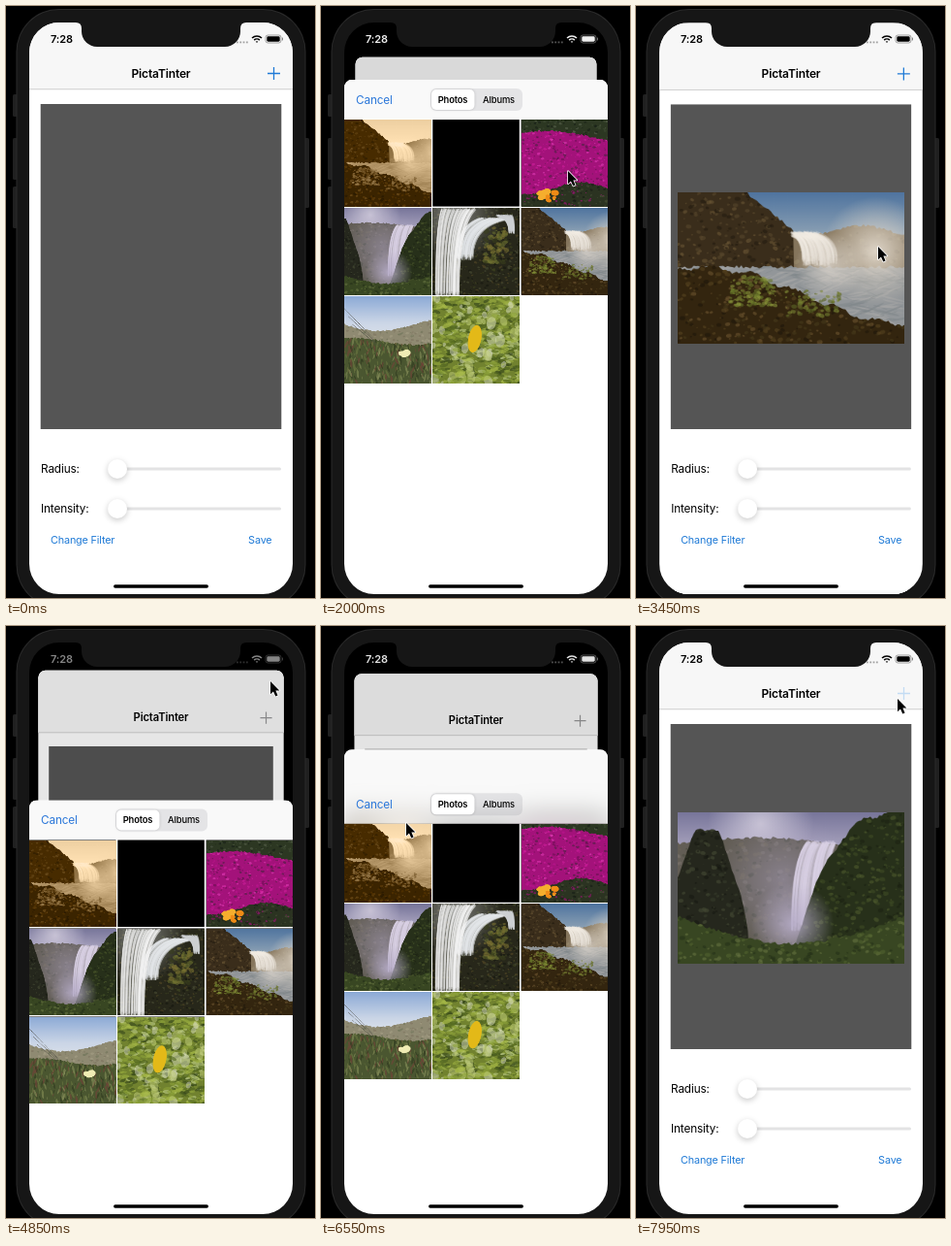
These frames come from a looping animation (319 px wide and 610 px high, 8000 ms). An HTML page with a canvas:

```html
<!DOCTYPE html>
<html lang="en">
<head>
<meta charset="utf-8">
<title>Photo picker</title>
<style>
html, body { margin: 0; width: 100%; height: 100%; overflow: hidden; background: #000; }
canvas { display: block; width: 319px; height: 610px; }
</style>
</head>
<body>
<canvas id="stage" width="319" height="610"></canvas>
<script>
const g = document.getElementById('stage').getContext('2d');
const LOOP = 8000, OMEGA = 18.26;
const SCREEN = { x: 24, y: 17, w: 272, h: 589 };
const BEZEL = '#161616', BLUE = '#1f7ad6';
const clamp = (v, lo = 0, hi = 1) => Math.max(lo, Math.min(hi, v));
const mix = (a, b, k) => a + (b - a) * k;
const ease = k => k * k * (3 - 2 * k);
const { sin, abs, PI } = Math;

function box(c, x, y, w, h, r, fill) {
  c.beginPath();
  c.roundRect(x, y, w, h, r);
  c.fillStyle = fill;
  c.fill();
}

function text(str, x, y, size, color, weight = 400, align = 'left') {
  g.font = `${weight} ${size}px Inter, "Open Sans", sans-serif`;
  g.letterSpacing = '-0.15px';
  g.textAlign = align;
  g.textBaseline = 'middle';
  g.fillStyle = color;
  g.fillText(str, x, y);
}

// ---- Photos: painted scenes, 300 x 200 each ----
function scene(sky, paint) {
  const cv = document.createElement('canvas');
  cv.width = 300;
  cv.height = 200;
  const c = cv.getContext('2d');
  let seed = 7;
  const rnd = () => (seed = seed * 16807 % 2147483647) / 2147483647;
  const grad = c.createLinearGradient(0, 0, 0, 120);
  sky.forEach((s, i) => grad.addColorStop(i / (sky.length - 1), s));
  c.fillStyle = grad;
  c.fillRect(0, 0, 300, 200);

  // Soft blotches scattered over an area
  const dabs = (n, x, y, w, h, size, tones, tall = 0.7, alpha = 0.6) => {
    c.globalAlpha = alpha;
    for (let i = 0; i < n; i++) {
      const r = size * (0.3 + rnd());
      c.beginPath();
      c.ellipse(x + rnd() * w, y + rnd() * h, r, r * tall, rnd() - 0.5, 0, 7);
      c.fillStyle = tones[i % tones.length];
      c.fill();
    }
    c.globalAlpha = 1;
  };
  // Ground below a ridge line, with its texture
  const hill = (ridge, fill, tones = [], size = 3, tall = 0.7) => {
    c.save();
    c.beginPath();
    c.moveTo(0, 200);
    for (let x = 0; x <= 300; x += 3) c.lineTo(x, ridge(x) + rnd() * 4 - 2);
    c.lineTo(300, 200);
    c.fillStyle = fill;
    c.fill();
    c.clip();
    if (tones.length) dabs(900, 0, 0, 300, 200, size, tones, tall);
    c.restore();
  };
  // Falling water: many thin strands that bend over an edge
  const fall = (x0, y0, x1, y1, w0, w1, color) => {
    c.strokeStyle = color;
    c.lineWidth = 2.5;
    c.globalAlpha = 0.35;
    for (let i = 0; i < 110; i++) {
      const u = rnd() - 0.5;
      c.beginPath();
      c.moveTo(x0 + u * w0, y0 + rnd() * 6);
      c.quadraticCurveTo(x1 + u * w1, mix(y0, y1, 0.2), x1 + u * w1, y1 - rnd() * 14);
      c.stroke();
    }
    c.globalAlpha = 1;
  };
  const glow = (x, y, r, rgb, a) => {
    const m = c.createRadialGradient(x, y, 0, x, y, r);
    m.addColorStop(0, `rgba(${rgb},${a})`);
    m.addColorStop(1, `rgba(${rgb},0)`);
    c.fillStyle = m;
    c.fillRect(0, 0, 300, 200);
  };
  paint({ c, dabs, hill, fall, glow });
  return cv;
}

function goldFalls({ dabs, hill, fall, glow }) {
  hill(x => x > 150 ? 50 + 6 * sin(x / 22) : 210, '#85755c', ['#978769', '#6f6049']);
  hill(x => x < 156 ? (x - 90) * 0.8 : 210, '#3a2d1b', ['#57462c', '#241c10', '#6a5535']);
  hill(() => 99, '#929699', ['#a5a6a5', '#81878a'], 16, 0.08);
  glow(262, 78, 72, '226,217,204', 0.95);
  fall(166, 52, 188, 98, 34, 46, '#f1ece3');
  glow(200, 98, 45, '222,215,206', 0.8);
  hill(x => 100 + 74 * ease(clamp((x - 40) / 260)) + 3 * sin(x / 9), '#33250f',
    ['#574321', '#1e160b', '#6d5430', '#463a1b']);
  dabs(130, 70, 112, 60, 38, 3, ['#68742a', '#88953a']);
  dabs(90, 140, 130, 75, 34, 3, ['#5d6826', '#7c8634']);
}

const gold = scene(['#4f749f', '#8fa3b5', '#d5cbba'], goldFalls);

const sepia = scene(['#d9d4c0', '#efe8d0', '#f5efdb'], kit => {
  goldFalls(kit);
  kit.c.globalCompositeOperation = 'color';
  kit.c.fillStyle = '#86683a';
  kit.c.fillRect(0, 0, 300, 200);
});

const violet = scene(['#77759a', '#b4aec6', '#d4cbd6'], ({ hill, fall, glow }) => {
  glow(110, 16, 70, '228,222,234', 0.7);
  hill(x => 42 - 8 * sin(x / 65), '#625d55', ['#6f6859', '#4c4d42', '#79726c']);
  glow(140, 90, 90, '176,166,196', 0.5);
  fall(190, 38, 174, 158, 38, 46, '#d9d1e6');
  hill(x => x > 150 ? 195 * ((300 - x) / 150) ** 2.8 + 3 * sin(x / 8) : 210, '#27301a',
    ['#3e4b25', '#1b2213', '#4d5a2d']);
  hill(x => x < 95 ? 20 + (x - 38) ** 2 / 22 + 5 * sin(x / 5) : 210, '#25271d',
    ['#363b2b', '#171812', '#454a34']);
  glow(152, 148, 55, '184,174,202', 0.9);
  hill(x => 138 + 36 * sin(PI * x / 300), '#384622', ['#53632f', '#263118', '#677440']);
});

const stream = scene(['#4a4d3c', '#33351f'], ({ dabs, hill, fall, glow }) => {
  hill(() => 0, '#27271a', ['#3c4121', '#15160f', '#544827', '#484c35']);
  glow(100, 20, 110, '196,198,202', 0.55);
  dabs(90, 170, 45, 50, 80, 6, ['#6a7030', '#7c7232', '#383d1c']);
  fall(190, 22, 124, 120, 70, 40, '#e2e4e7');
  fall(110, 0, 84, 205, 80, 55, '#f2f2f4');
  fall(215, 15, 232, 60, 40, 14, '#cfd1d4');
});

const flowers = scene(['#28331f', '#3b4028'], ({ dabs, hill }) => {
  hill(() => 0, '#2c3722', ['#58624c', '#171f16', '#3f4c33']);
  hill(x => 42 - 16 * sin(x / 70), '#a3127a', ['#cf1f9c', '#6c0f52', '#e03bb4', '#bd1590', '#4a2340']);
  hill(x => 158 + 14 * sin(x / 40), '#2b3321', ['#454d35', '#171d14', '#a3127a']);
  dabs(16, 88, 164, 42, 22, 9, ['#ef8b16', '#f5ae2e'], 0.7, 1);
});

const field = scene(['#8caad6', '#cad5e6', '#e8ebef'], ({ c, dabs, hill }) => {
  hill(x => 66 - 14 * sin(x / 48 + 2), '#8f8a72', ['#a59f86', '#70755a', '#7d7460']);
  hill(x => 104 - 8 * sin(x / 45), '#4a5630', ['#6d7942', '#303a1e', '#74443a', '#87905a'], 2, 4);
  c.strokeStyle = '#4d4c45';
  for (let d = 0; d < 40; d += 18) {
    c.beginPath();
    c.moveTo(50 + d / 2, 28 + d);
    c.lineTo(116 + d / 3, 96 + d / 2);
    c.stroke();
  }
  dabs(6, 178, 126, 14, 8, 10, ['#efecb4'], 0.6, 1);
});

const leaves = scene(['#a5aa83', '#73863a'], ({ c, dabs, hill }) => {
  hill(() => 0, '#71822f', ['#9db041', '#4b5f1e', '#bac984', '#35451a', '#8ca03a'], 8, 0.45);
  dabs(60, 50, 0, 200, 200, 9, ['#d5d9c0', '#c1cd7c'], 1.4, 0.5);
  dabs(90, 50, 0, 200, 200, 10, ['#8ea43a', '#54691f', '#a9bb4a'], 0.4);
  c.fillStyle = '#e3b918';
  c.beginPath();
  c.ellipse(147, 98, 15, 32, 0.2, 0, 7);
  c.fill();
});

const GRID = [sepia, null, flowers, violet, stream, gold, field, leaves];

// ---- Timing ----
const PLUS = [272, 72];
const MOVES = [
  { at: 150, ms: 700, to: PLUS },
  { at: 1150, ms: 400, to: [255, 170] },
  { at: 2000, ms: 400, to: [250, 248] },
  { at: 4050, ms: 300, to: PLUS },
  { at: 4550, ms: 300, to: [273, 57] },
  { at: 5550, ms: 700, to: [88, 203] },
  { at: 7400, ms: 450, to: [270, 75] }
];
// The sheet opens or closes; it can stall for a moment while a photo loads
const SHEET = [
  { at: -LOOP, closing: true, photo: null },
  { at: 1600, closing: false, photo: null, stallAt: 280, stall: 120 },
  { at: 2930, closing: true, photo: gold, stallAt: 20, stall: 180 },
  { at: 4695, closing: false, photo: gold },
  { at: 6517, closing: true, photo: violet }
];

function cursorAt(t) {
  return MOVES.reduce(([x, y], { at, ms, to }) => {
    const k = ease(clamp((t - at) / ms));
    return [mix(x, to[0], k), mix(y, to[1], k)];
  }, [272, 497]);
}

function sheetAt(t) {
  const { at, closing, photo, stallAt = 0, stall = 0 } = SHEET.findLast(e => e.at <= t);
  const gone = t - at;
  return { closing, photo, s: (gone - clamp(gone - stallAt, 0, stall)) / 1000 };
}

// ---- Interface ----
function plus(color) {
  g.strokeStyle = color;
  g.lineWidth = 1.3;
  g.beginPath();
  g.moveTo(270, 69.5); g.lineTo(283, 69.5);
  g.moveTo(276.5, 63); g.lineTo(276.5, 76);
  g.stroke();
}

function slider(label, y) {
  text(label, 36, y + 0.5, 11.8, '#000');
  box(g, 105, y - 1.5, 179, 3, 1.5, '#e3e3e4');
  g.save();
  g.shadowColor = 'rgba(0,0,0,.22)';
  g.shadowBlur = 6;
  g.shadowOffsetY = 2;
  box(g, 105, y - 10, 20, 20, 10, '#fff');
  g.restore();
}

function mainPage(photo, plusColor) {
  const { x, y, w, h } = SCREEN;
  box(g, x, y, w, h, 8, '#fff');
  box(g, x, y, w, 69, [8, 8, 0, 0], '#f7f7f7');
  g.fillStyle = '#bcbcbc';
  g.fillRect(x, 85.5, w, 0.7);
  text('PictaTinter', 160, 70, 12, '#000', 600, 'center');
  plus(plusColor);
  g.fillStyle = '#555';
  g.fillRect(35.7, 101, 248.6, 335);
  if (photo) g.drawImage(photo, 43, 191.5, 234, 156);
  slider('Radius:', 477);
  slider('Intensity:', 518);
  text('Change Filter', 46, 551, 10.8, BLUE);
  text('Save', 274.5, 551, 10.8, BLUE, 400, 'right');
}

function photoGrid(top) {
  GRID.forEach((img, i) => {
    const x = SCREEN.x + i % 3 * 91.3, y = top + Math.floor(i / 3) * 91;
    g.fillStyle = '#000';
    g.fillRect(x, y, 89.5, 89.5);
    if (img) g.drawImage(img, 50, 0, 200, 200, x, y, 89.5, 89.5);
  });
}

function sheet(top, closing, s) {
  const { x, w } = SCREEN;
  const shift = closing ? 36 * clamp((s - 0.02) / 0.0187) : 0;
  const barH = closing ? 76.5 : 40.5;
  const gridTop = top + 41 + shift;
  g.save();
  g.beginPath();
  g.roundRect(x, top, w, 610, [8, 8, 0, 0]);
  g.clip();
  g.fillStyle = '#fff';
  g.fillRect(x, top, w, 610);
  photoGrid(gridTop);

  // Translucent bar: the grid shows through as a blur
  g.save();
  g.beginPath();
  g.rect(x, top, w, barH);
  g.clip();
  g.fillStyle = '#fff';
  g.fillRect(x, top, w, barH);
  if (closing) {
    g.filter = 'blur(14px)';
    photoGrid(gridTop);
    g.filter = 'none';
  }
  g.fillStyle = 'rgba(248,248,248,.82)';
  g.fillRect(x, top, w, barH);
  g.restore();

  const mid = top + barH - 20;
  text('Cancel', 36, mid + 0.5, 11.8, '#2b77d9');
  box(g, 113, mid - 11.5, 95, 23, 6, 'rgba(118,118,128,.16)');
  g.shadowColor = 'rgba(0,0,0,.18)';
  g.shadowBlur = 3;
  box(g, 114, mid - 10.5, 44.5, 21, 5, '#fff');
  g.shadowColor = 'transparent';
  text('Photos', 136, mid + 0.5, 9.4, '#000', 600, 'center');
  text('Albums', 183.5, mid + 0.5, 9.4, '#000', 500, 'center');
  g.restore();
}

function statusBar(level) {
  const v = Math.round(255 * level), color = `rgb(${v},${v},${v})`;
  text('7:28', 46, 34.5, 11, color, 600);
  g.fillStyle = g.strokeStyle = color;
  g.globalAlpha = 0.35;
  for (let i = 0; i < 4; i++) g.fillRect(238 + i * 3.3, 36.5, 1.8, 1.8);
  g.globalAlpha = 1;
  g.lineWidth = 1.6;
  for (let r = 1; r < 8; r += 3) {
    g.beginPath();
    g.arc(259, 38, r, -0.75 * PI, -0.25 * PI);
    g.stroke();
  }
  g.globalAlpha = 0.45;
  g.lineWidth = 0.8;
  g.beginPath();
  g.roundRect(268, 30, 16, 8, 2.4);
  g.stroke();
  g.fillRect(285, 32.6, 1, 2.8);
  g.globalAlpha = 1;
  box(g, 269.3, 31.3, 13.4, 5.4, 1.4, color);
}

function phone() {
  g.fillStyle = '#000';
  g.fillRect(0, 0, 319, 610);
  box(g, 7, 91, 5, 23, 1.5, '#202020');
  box(g, 7, 136, 5, 43, 1.5, '#202020');
  box(g, 7, 186, 5, 43, 1.5, '#202020');
  box(g, 308, 136, 5, 72, 1.5, '#202020');
  box(g, 10.5, 3, 299, 617, 44, '#2a2a2a');
  box(g, 11.5, 4, 297, 615, 43, BEZEL);
}

function notch() {
  box(g, 78, 0, 164, 42, 16, BEZEL);
  for (const side of [-1, 1]) {
    const edge = 160 + side * 82;
    g.beginPath();
    g.moveTo(edge + side * 6, 17);
    g.quadraticCurveTo(edge, 17, edge, 23);
    g.lineTo(edge, 17);
    g.fill();
  }
}

function pointer([x, y]) {
  g.save();
  g.translate(x, y);
  g.scale(0.88, 0.88);
  g.beginPath();
  [[0, 0], [0, 15], [3.4, 11.8], [6, 17.6], [8.6, 16.5], [6.1, 10.8], [10.6, 10.8]].forEach(p => g.lineTo(...p));
  g.closePath();
  g.lineWidth = 1.8;
  g.lineJoin = 'round';
  g.strokeStyle = '#fff';
  g.stroke();
  g.fillStyle = '#000';
  g.fill();
  g.restore();
}

function draw(t) {
  const { closing, photo, s } = sheetAt(t);
  const decay = (1 + OMEGA * s) * Math.exp(-OMEGA * s);
  const p = closing ? 1 - decay : decay;       // 0 = sheet open, 1 = sheet away
  const fade = clamp(s / 0.3);
  const light = closing ? 1 - fade : fade;     // status bar: 0 black, 1 white
  const pos = cursorAt(t);
  const pressed = p > 0.99 && Math.hypot(pos[0] - PLUS[0], pos[1] - PLUS[1]) < 8;
  const gray = clamp(light * 2);
  const plusColor = pressed ? '#c3dcf3'
    : `rgb(${mix(31, 150, gray)},${mix(122, 150, gray)},${mix(214, 152, gray)})`;
  const { x, y, w, h } = SCREEN;

  phone();
  g.save();
  g.beginPath();
  g.roundRect(x, y, w, h, 31);
  g.clip();
  g.fillStyle = '#000';
  g.fillRect(x, y, w, h);

  const k = mix(248, w, p) / w;
  g.save();
  g.translate(160, mix(54, y, p));
  g.scale(k, k);
  g.translate(-160, -y);
  mainPage(photo, plusColor);
  box(g, x, y, w, h, 8, `rgba(0,0,0,${0.125 * (1 - p)})`);
  g.restore();

  if (p < 0.999) sheet(mix(56, 610, p), closing, s);
  notch();
  statusBar(light);
  box(g, 111, 596.2, 98, 3.6, 1.8, '#000');
  g.restore();

  if (t >= MOVES[0].at) pointer(pos);
}

const start = performance.now();
function tick() {
  draw((performance.now() - start) % LOOP);
  requestAnimationFrame(tick);
}
tick();
</script>
</body>
</html>
```
